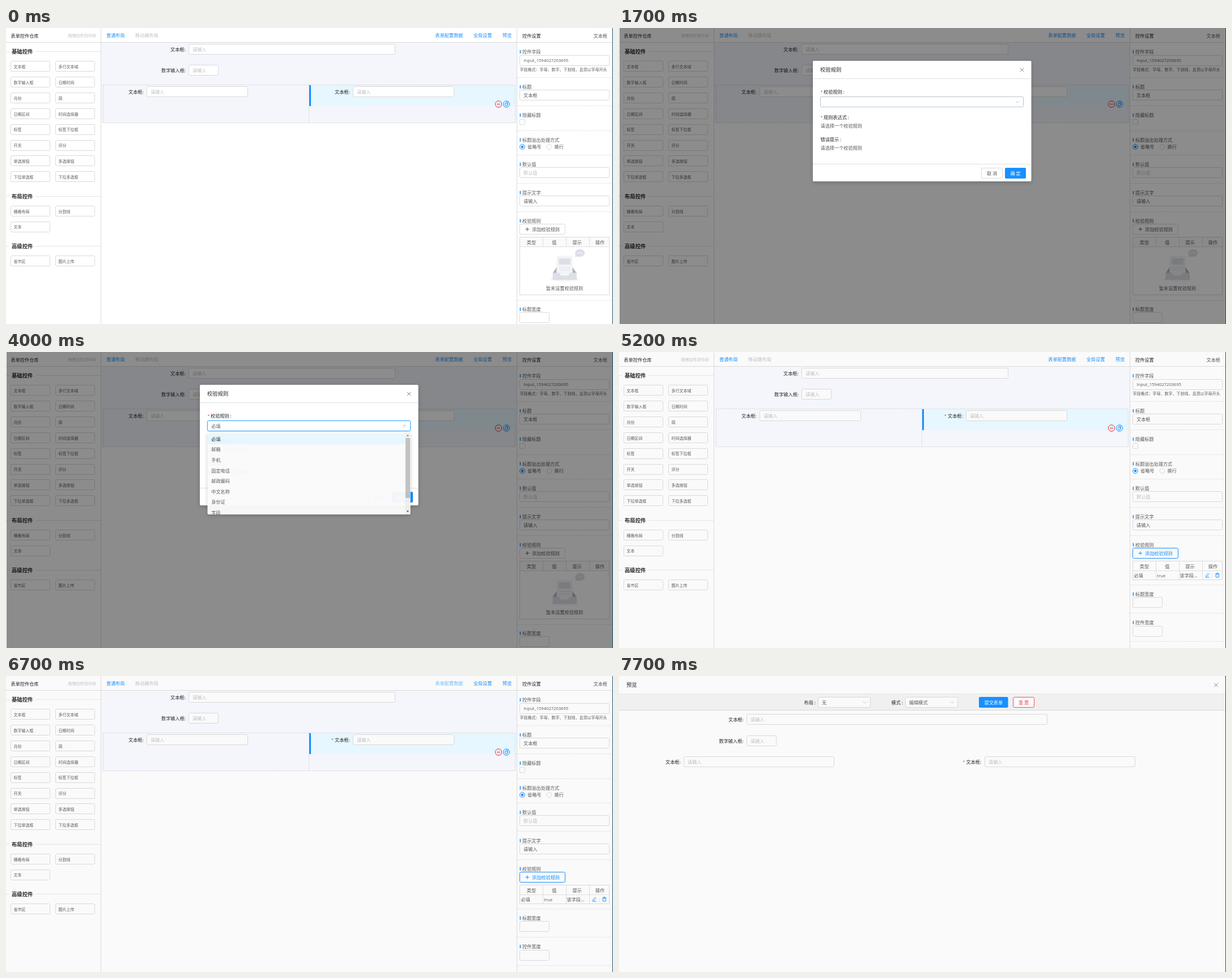
An HTML page with a canvas for the animation above (8 s loop, 1071 by 523 pixels).

```html
<!DOCTYPE html>
<html lang="zh-CN">
<head>
<meta charset="utf-8">
<title>表单设计器</title>
<style>
html, body { margin: 0; width: 100%; height: 100%; overflow: hidden; background: #fff; }
canvas { display: block; width: 1071px; height: 523px; }
</style>
</head>
<body>
<canvas id="stage" width="1071" height="523"></canvas>
<script>
const W = 1071, H = 523, LOOP = 8000;
const FONT = '"Noto Sans CJK SC", "Noto Sans CJK", "Open Sans", sans-serif';
const LATIN = '"Open Sans", sans-serif';
const BLUE = '#1890ff', HOVER = '#40a9ff', RED = '#f5222d', EDGE = '#d9d9d9', RULE = '#e4e4e4';
const INK = '#262626', TEXT = '#595959', HINT = '#bfbfbf';
const S = 7, M = 8.17, L = 9.33;

const screen = document.getElementById('stage').getContext('2d');
const layerCanvas = document.createElement('canvas');
layerCanvas.width = W;
layerCanvas.height = H;
const layer = layerCanvas.getContext('2d');
let g = screen, bg = '#fff';

const clamp = v => Math.max(0, Math.min(1, v));
const phase = (t, start, length) => clamp((t - start) / length);
const outCirc = p => Math.sqrt(1 - (1 - p) ** 2);
const inOutCirc = p => p < .5 ? (1 - Math.sqrt(1 - 4 * p * p)) / 2 : (1 + Math.sqrt(1 - (2 - 2 * p) ** 2)) / 2;
const crisp = v => Math.floor(v) + .5;

function text(s, x, y, color = TEXT, size = M, align = 'left', weight = 400, font = FONT) {
  g.font = `${weight} ${size}px ${font}`;
  g.textAlign = align;
  g.fillStyle = color;
  g.fillText(s, x, y + size * .37);
}

function rect(x1, y1, x2, y2, color) {
  g.fillStyle = color;
  g.fillRect(x1, y1, x2 - x1, y2 - y1);
}

function box(x1, y1, x2, y2, edge = EDGE, fill = bg, r = 2) {
  g.beginPath();
  g.roundRect(x1, y1, x2 - x1, y2 - y1, r);
  if (fill) { g.fillStyle = fill; g.fill(); }
  if (edge) { g.strokeStyle = edge; g.lineWidth = 1; g.stroke(); }
}

function path(points, color, width = 1, dash = []) {
  g.beginPath();
  points.forEach(([x, y]) => g.lineTo(x, y));
  g.strokeStyle = color;
  g.lineWidth = width;
  g.setLineDash(dash);
  g.stroke();
  g.setLineDash([]);
}

function poly(points, color) {
  g.beginPath();
  points.forEach(([x, y]) => g.lineTo(x, y));
  g.fillStyle = color;
  g.fill();
}

function oval(x, y, rx, ry, fill, edge) {
  g.beginPath();
  g.ellipse(x, y, rx, ry, 0, 0, 7);
  if (fill) { g.fillStyle = fill; g.fill(); }
  if (edge) { g.strokeStyle = edge; g.lineWidth = 1; g.stroke(); }
}

const hline = (x1, x2, y, color = RULE, dash) => path([[x1, y], [x2, y]], color, 1, dash);
const vline = (x, y1, y2, color = RULE, dash) => path([[x, y1], [x, y2]], color, 1, dash);

function input(x1, x2, y, value, color = HINT) {
  const top = crisp(y - 9);
  box(crisp(x1), top, crisp(x2), top + 18);
  if (value) text(value, x1 + 6.5, y + .5, color);
}

function field(label, x, y, x1, x2, required) {
  text(label + ':', x, y, INK);
  if (required) text('*', x - 6, y + 1, RED);
  input(x1, x2, y - .5, '请输入');
}

function chevron(x, y, turn = 0) {
  g.save();
  g.translate(x, y);
  g.rotate(turn * Math.PI);
  path([[-3, -1.5], [0, 1.5], [3, -1.5]], HINT, .9);
  g.restore();
}

function cross(x, y) {
  path([[x - 3.3, y - 3.3], [x + 3.3, y + 3.3]], '#777', .9);
  path([[x + 3.3, y - 3.3], [x - 3.3, y + 3.3]], '#777', .9);
}

const GROUPS = [
  ['基础控件', 41.5, ['文本框', '多行文本域', '数字输入框', '日期时间', '月份', '周', '日期区间', '时间选择器',
    '标签', '标签下拉框', '开关', '评分', '单选按钮', '多选按钮', '下拉单选框', '下拉多选框']],
  ['布局控件', 297, ['栅格布局', '分割线', '文本']],
  ['高级控件', 385, ['省市区', '图片上传']]
];

function leftPanel() {
  text('表单控件仓库', 8.5, 13.5, INK, M, 'left', 500);
  text('拖拽控件到中间', 158.5, 13.5, HINT, S, 'right');
  for (const [name, y, items] of GROUPS) {
    hline(0, 6, crisp(y));
    hline(52, 168, crisp(y));
    text(name, 10, y + .3, INK, L, 'left', 600);
    items.forEach((item, i) => {
      const x = i % 2 ? 87.5 : 8.5, cy = y + 26.4 + (i >> 1) * 27.83;
      const top = crisp(cy - 9);
      box(x, top, x + 69, top + 18);
      text(item, x + 5, cy + .6, TEXT, S);
    });
  }
}

function workArea(t) {
  rect(168, 26, 901, 167.5, '#f4f6fc');
  field('文本框', 290, 38, 322.5, 686);
  field('数字输入框', 274, 75, 322.5, 374.5);
  g.setLineDash([2, 1.5]);
  box(171.5, 100.5, 898.5, 167.5, '#d0d3d9', null, 0);
  g.setLineDash([]);
  vline(534.5, 100, 167, '#d0d3d9', [2, 1.5]);
  rect(538, 101, 898, 138, '#e6f7ff');
  rect(535, 101, 538, 138, BLUE);
  field('文本框', 216, 112.5, 248.5, 426.5);
  field('文本框', 580, 112.5, 612.5, 790.5, t >= 4900);
  oval(869, 134.5, 5.7, 5.7, null, RED);
  hline(866, 872, 134.5, RED);
  oval(883, 134.5, 5.7, 5.7, null, BLUE);
  box(880.7, 132.5, 884.3, 137.5, BLUE, null, .5);
  path([[882, 131], [885.7, 131], [885.7, 136]], BLUE, .8);
}

function topLinks(t) {
  const color = on => on ? '#69bcff' : BLUE;
  text('普通布局', 177, 13, BLUE);
  text('移动端布局', 228, 13, HINT);
  text('表单配置数据', 757.3, 13, color(t >= 6700 && t < 7000));
  text('全局设置', 824.7, 13, color(t >= 7000 && t < 7100));
  text('预览', 876, 13, color(t >= 7100));
}

function emptyArt() {
  oval(985.5, 444, 25, 3.5, '#f3f3f4');
  poly([[964.5, 433], [972, 422], [999, 422], [1007, 433]], '#aeb8c2');
  box(971.5, 402.5, 999.5, 436, null, '#f3f4f6', 1.5);
  rect(975.5, 407, 996, 418, '#dce0e6');
  hline(976, 995.5, 423.5, '#dce0e6');
  hline(976, 995.5, 427.5, '#dce0e6');
  poly([[964.5, 432.5], [976, 432.5], [979, 437], [992, 437], [995, 432.5], [1007, 432.5], [1007, 445], [964.5, 445]], '#dce0e6');
  oval(1012.5, 397.5, 8.5, 6.7, '#dce0e6');
  poly([[1005, 399], [1004.5, 405], [1010, 403]], '#dce0e6');
  for (const x of [1009, 1012.5, 1016]) oval(x, 397.5, 1, 1, '#fff');
}

function ruleTable(filled) {
  const bottom = filled ? 402.5 : 471.5;
  box(906.5, 369.5, 1064.5, bottom, EDGE, bg, 0);
  rect(907, 370, 1064, 386, '#fafafa');
  hline(907, 1064, 386.5, '#dedede');
  for (const x of [947.5, 988.5, 1029.5]) vline(x, 370, filled ? 402 : 386, '#dedede');
  ['类型', '值', '提示', '操作'].forEach((s, i) => text(s, 927 + i * 40.3, 378.5, TEXT, M, 'center'));
  if (!filled) {
    emptyArt();
    text('暂未设置校验规则', 985.5, 460.3, TEXT, M, 'center');
    return;
  }
  text('必填', 908.5, 395);
  text('true', 949.5, 394.7, TEXT, 7.6, 'left', 400, LATIN);
  text('该字段...', 989.5, 395);
  path([[1035.5, 396.5], [1036, 394.5], [1039.5, 391], [1041, 392.5], [1037.5, 396], [1035.5, 396.5]], BLUE, .8);
  hline(1034.5, 1041.5, 398, BLUE);
  vline(1047, 391, 399, RULE);
  box(1053.2, 392.5, 1058.3, 398, BLUE, null, .5);
  hline(1052, 1059.5, 392, BLUE);
  hline(1054.5, 1057, 390.5, BLUE);
}

function setting(label, y) {
  rect(906.6, y - 3, 908.2, y + 3, BLUE);
  text(label, 911, y + .3);
}

function rightPanel(t) {
  const filled = t >= 4900, shift = filled ? -69.3 : 0;
  text('控件设置', 911, 13.5, INK, M, 'left', 500);
  text('文本框', 1061, 13.5, TEXT, M, 'right');
  for (const y of [87.5, 137.5, 181.5, 224.5, 274.5, 324.5, 481 + shift, 531 + shift, 581 + shift])
    hline(902, 1070, crisp(y), '#dcdcdc', [2, 1.5]);

  setting('控件字段', 42);
  input(906.5, 1064.5, 57, '');
  text('Input_1594027203695', 913.5, 57.3, TEXT, 7.6, 'left', 400, LATIN);
  text('字段格式：字母、数字、下划线，且须以字母开头', 906.5, 73, TEXT, S);
  setting('标题', 104);
  input(906.5, 1064.5, 118.5, '文本框', TEXT);
  setting('隐藏标题', 154);
  box(906.5, 161.5, 915.5, 170.5, EDGE, bg, 1);
  setting('标题溢出处理方式', 197.5);
  oval(911, 210, 4.4, 4.4, bg, BLUE);
  oval(911, 210, 2.3, 2.3, BLUE);
  text('省略号', 920, 210);
  oval(958.5, 210, 4.4, 4.4, bg, EDGE);
  text('换行', 967.5, 210);
  setting('默认值', 241);
  input(906.5, 1064.5, 255.5, '默认值');
  setting('提示文字', 291);
  input(906.5, 1064.5, 305.5, '请输入', TEXT);

  setting('校验规则', 340.5);
  const active = (t >= 300 && t < 1200) || (t >= 4900 && t < 7400);
  const tone = active ? (t < 500 ? HOVER : BLUE) : TEXT;
  if (t >= 500 && t < 1100) box(905.5, 345.5, 987.5, 365.5, 'rgba(24,144,255,.3)', null, 3);
  box(906.5, 346.5, 986.5, 364.5, active ? tone : EDGE);
  hline(916.5, 923, 355.5, tone);
  vline(919.75, 352.2, 358.8, tone);
  text('添加校验规则', 928, 355.7, tone);

  ruleTable(filled);
  setting('标题宽度', 497 + shift);
  input(906.5, 958.5, 511.8 + shift);
  if (filled) {
    setting('控件宽度', 478);
    input(906.5, 958.5, 493);
  }
}

function page(t) {
  rect(0, 0, W, H, bg);
  workArea(t);
  leftPanel();
  topLinks(t);
  rightPanel(t);
  hline(0, 1070, 25.5, '#dcdcdc');
  vline(167.5, 0, H, '#dcdcdc');
  vline(901.5, 0, H, '#dcdcdc');
}

function sheet(x1, y1, x2, y2, fill = bg) {
  g.save();
  g.shadowColor = 'rgba(0,0,0,.2)';
  g.shadowBlur = 7;
  g.shadowOffsetY = 2;
  box(x1, y1, x2, y2, null, fill);
  g.restore();
}

function ruleDialog(t) {
  const chosen = t >= 4000, open = phase(t, 1850, 200) * (1 - phase(t, 3950, 200));
  const focus = t >= 1800;
  sheet(342, 58, 727.5, 271);
  text('校验规则', 355, 74, INK, L);
  cross(711, 74);
  hline(342, 727.5, 89.5, '#e0e0e0');
  text('*', 355.5, 113.5, RED);
  text('校验规则 :', 361, 112.5, INK);
  if (focus) box(354.5, 120.5, 714.5, 140.5, 'rgba(24,144,255,.15)', null, 3);
  box(355.5, 121.5, 713.5, 139.5, focus ? HOVER : t >= 1700 ? '#b5c4d0' : EDGE);
  if (chosen) text('必填', 362.3, 130.8);
  chevron(703, 130.5, open);
  text('*', 355.5, 159, RED);
  text('规则表达式 :', 361, 158, INK);
  text('请选择一个校验规则', 355.5, 173);
  text('错误提示 :', 355.5, 197, INK);
  text('请选择一个校验规则', 355.5, 212);
  hline(342, 727.5, 240.5, '#e0e0e0');
  box(639.5, 247.5, 676.5, 265.5);
  text('取 消', 658, 256.7, TEXT, M, 'center');
  box(681, 247, 718, 266, null, t >= 4800 ? HOVER : BLUE);
  text('确 定', 699.5, 256.7, '#fff', M, 'center', 500);
}

const OPTIONS = ['必填', '邮箱', '手机', '固定电话', '邮政编码', '中文名称', '身份证', '字段', '正则'];

function dropdown(t) {
  const scroll = 24 * (phase(t, 2700, 300) - phase(t, 3200, 300));
  sheet(355.5, 142, 713.5, 287, '#fafafa');
  g.save();
  g.beginPath();
  g.rect(355.5, 142, 358, 145);
  g.clip();
  OPTIONS.forEach((name, i) => {
    const y = 153.6 + i * 18.6 - scroll;
    if (!i) rect(356, y - 9.3, 704, y + 9.3, '#e6f7ff');
    text(name, 362.3, y + .2, i ? TEXT : INK, M, 'left', !i && t >= 4000 ? 500 : 400);
  });
  rect(704, 142, 713.5, 287, '#f1f1f1');
  const top = 152 + scroll * .75;
  rect(705, top, 713, top + 106, '#c1c1c1');
  poly([[706.5, 148.5], [711, 148.5], [708.75, 146]], '#777');
  poly([[706.5, 280.5], [711, 280.5], [708.75, 283]], '#444');
  g.restore();
}

function preview() {
  sheet(0, 0, 1070, 525);
  text('预览', 13, 16, INK, L);
  cross(1053.5, 16);
  rect(0, 31, 1070, 60, '#f0f0f0');
  hline(0, 1070, 31.5, '#e8e8e8');
  hline(0, 1070, 60.5, '#d9d9d9');
  const select = (label, x, left, value) => {
    text(label + ' :', x, 46.5, INK);
    box(left, 37.5, left + 92, 55.5);
    text(value, left + 6.5, 46.7, TEXT);
    chevron(left + 82, 46.5);
  };
  select('布局', 326.5, 351.5, '无');
  select('模式', 480.5, 505.5, '编辑模式');
  box(635, 37, 686.5, 56, null, BLUE);
  text('提交表单', 660.8, 46.5, '#fff', M, 'center', 500);
  box(695.5, 37.5, 732.5, 55.5, '#ff4d4f');
  text('重 置', 714, 46.5, '#ff4d4f', M, 'center');
  field('文本框', 193, 77.3, 225.5, 755.5);
  field('数字输入框', 176.5, 114.5, 225.5, 277);
  field('文本框', 82, 151.7, 114.5, 379.5);
  field('文本框', 612.5, 151.7, 645.5, 910);
  text('*', 606.5, 152.7, RED);
}

// Draws a group on its own layer, scaled about (ox, oy), then blends it as one.
function blend(draw, alpha, ox, oy, sx, sy) {
  layer.clearRect(0, 0, W, H);
  layer.save();
  layer.translate(ox, oy);
  layer.scale(sx, sy);
  layer.translate(-ox, -oy);
  g = layer;
  draw();
  g = screen;
  layer.restore();
  g.globalAlpha = alpha;
  g.drawImage(layerCanvas, 0, 0);
  g.globalAlpha = 1;
}

const zoom = (draw, e, ox, oy) => blend(draw, e, ox, oy, .2 + .8 * e, .2 + .8 * e);
const mask = a => rect(1, 0, 1070, H, `rgba(0,0,0,${.45 * a})`);

function render(t) {
  bg = t >= 5200 ? '#fafafa' : '#fff';
  page(t);
  if (t >= 800 && t < 5200) {
    const enter = phase(t, 775, 300), leave = phase(t, 4880, 300);
    mask(enter * (1 - leave));
    zoom(() => ruleDialog(t), outCirc(enter) * (1 - inOutCirc(leave)), 955, 355);
    const open = outCirc(phase(t, 1850, 200)), close = phase(t, 3994, 200);
    const show = open * (1 - close);
    if (show > 0) blend(() => dropdown(t), show, 534, 142, 1, .8 + .2 * open * (1 - close ** 2));
  }
  if (t >= 7400) {
    const enter = phase(t, 7302, 300);
    mask(enter);
    zoom(preview, outCirc(enter), 880, 10);
  }
  rect(1070, 0, 1071, H, '#1f4e68');
}

const start = performance.now();
function tick() {
  const t = (performance.now() - start) % LOOP;
  render(Math.floor(t / 100) * 100);
  requestAnimationFrame(tick);
}
tick();
</script>
</body>
</html>
```
